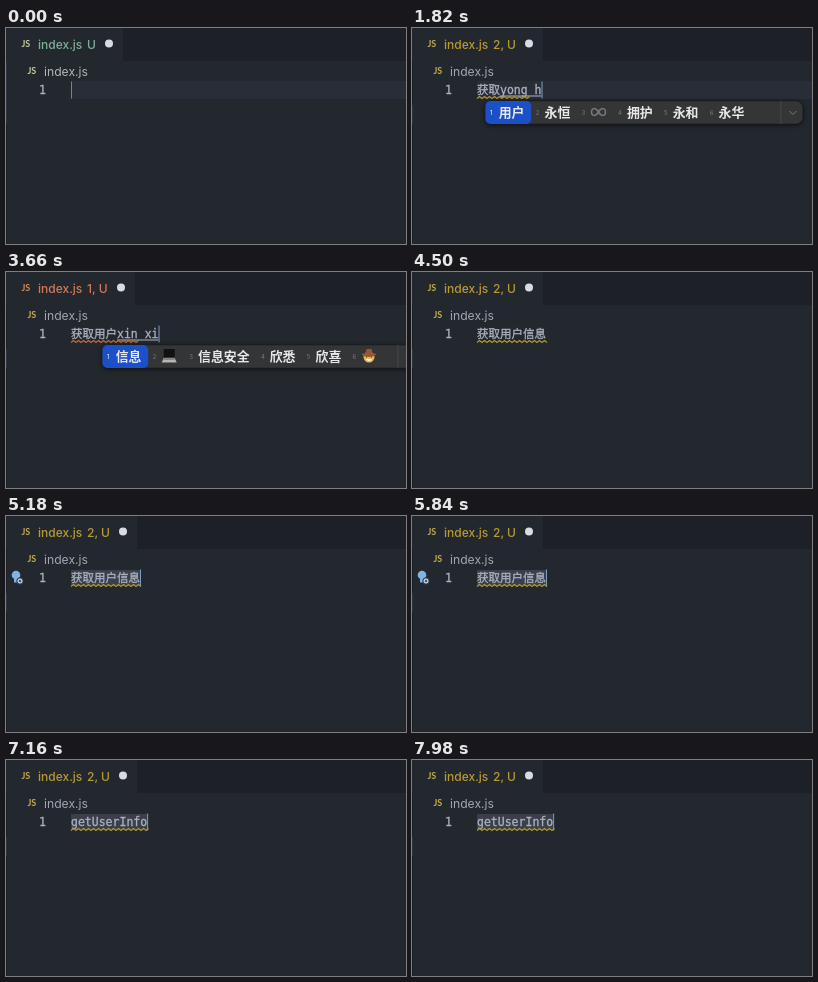
These frames come from a looping animation (400 by 216 pixels, 8000 ms). An HTML page:

```html
<!DOCTYPE html>
<html lang="zh-CN">
<head>
<meta charset="utf-8">
<style>
html, body { margin: 0; width: 100%; height: 100%; overflow: hidden; background: #23272e; }
svg { display: block; width: 400px; height: 216px; }
text { white-space: pre; }
.ui { font: 12.2px Inter, Roboto, sans-serif; }
.tab { font: 500 12px Inter, Roboto, sans-serif; }
.js { font: bold 9px Lato, "Open Sans", sans-serif; }
.code { font: 11.5px "DejaVu Sans Mono", "Noto Sans CJK SC", "Noto Sans CJK", monospace; fill: #abb2bf; stroke: #abb2bf; stroke-width: .3px; }
.pick { font: 700 12.9px "Noto Sans CJK SC", "Noto Sans CJK", sans-serif; fill: #e8e8e8; }
.num { font: 6px Inter, sans-serif; }
.panel { filter: drop-shadow(0 1px 2px #0009); }
</style>
</head>
<body>
<svg id="stage" viewBox="0 0 400 216"></svg>
<script>
const LOOP = 8000, LEFT = 65;
const stage = document.getElementById('stage');

// Time, committed text, text being composed, candidates
const steps = [
  [0, '', '', ''],
  [1320, '', 'h', '和 好 会 还 很 后'],
  [1370, '', 'hu', '户 湖 乎 护 胡 虎'],
  [1410, '', 'huo', '或 获 活 火 货 伙'],
  [1460, '', 'huo q', '获取 或去 火起 获 或'],
  [1510, '', 'huo qu', '获取 或取 货区 火曲 获'],
  [1560, '获取', '', ''],
  [1610, '获取', 'y', '有 一 也 要 用 以'],
  [1660, '获取', 'yo', '有 又 用 由 哟 友'],
  [1700, '获取', 'yon', '用 永 勇 涌 拥 泳'],
  [1750, '获取', 'yong', '用 永 勇 涌 拥 泳'],
  [1800, '获取', 'yong h', '用户 永恒 ∞ 拥护 永和 永华'],
  [1950, '获取', 'yong hu', '用户 拥护 永湖 用 永'],
  [2100, '获取用户', '', ''],
  [2600, '获取用户', 'x', ''],
  [2680, '获取用户', 'x', '下 想 小 向 些 新'],
  [2800, '获取用户', 'xi', '系 西 洗 喜 细 息'],
  [2960, '获取用户', 'xin', '新 心 信 欣 辛 芯'],
  [3220, '获取用户', 'xin x', '信息 新型 心想 欣喜 新'],
  [3500, '获取用户', 'xin xi', '信息 laptop 信息安全 欣悉 欣喜 cowboy'],
  [3820, '获取用户信息', '', ''],
  [6700, 'getUserInfo', '', '']
];

const icons = {
  '∞': x => `<path d="M${x + 8} 84c-3-5-7-4-7 0s4 5 7 0s7-4 7 0s-4 5-7 0" fill="none" stroke="#77787b" stroke-width="1.5"/>`,
  laptop: x => `<path d="M${x + 2} 77h11v8h-11z" fill="#111"/>
    <path d="M${x + 2} 86h11l2 4.500h-15z" fill="#b5b5b5"/><path d="M${x + 2} 87h11" stroke="#555"/>`,
  cowboy: x => `<circle cx="${x + 7.5}" cy="85" r="5.500" fill="#e9b45c"/>
    <path d="M${x} 81q3 2 4 0l1-4h5l1 4q1 2 4 0q-1 4-7.500 4t-7.500-4" fill="#96592f"/>
    <path d="M${x + 4.5} 87h6q-3 4-6 0" fill="#fff"/>
    <path d="M${x + 5} 84.500v1m5-1v1" stroke="#4b3020"/>`
};

const rect = (x, y, w, h, fill, more = '') =>
  `<rect x="${x}" y="${y}" width="${w}" height="${h}" fill="${fill}" ${more}/>`;
const text = (x, y, s, cls, fill) =>
  `<text x="${x}" y="${y}" class="${cls}"${fill ? ` fill="${fill}"` : ''}>${s}</text>`;
const width = s => [...s].reduce((w, c) => w + (c > '\u2e7f' ? 11.5 : 6.92), 0);

function wave(end, color) {
  let d = `M${LEFT} 70.5`;
  for (let x = LEFT, up = 1; x < end; x += 2.5, up = !up) d += `l2.5 ${up ? -2 : 2}`;
  return `<path d="${d}" fill="none" stroke="${color}" stroke-width="1.1"/>`;
}

function panel(x, list) {
  let out = rect(x, 73, 317.5, 23, '#343537', 'rx="7" stroke="#1a1b1d" stroke-width=".6"');
  let at = x;
  list.split(' ').forEach((word, i) => {
    const icon = icons[word], w = icon ? 36.6 : 20 + 12.9 * word.length;
    if (!i) out += rect(x, 73, w, 23, '#1b50c9', 'rx="5"');
    out += text(at + 4.5, 86.5, i + 1, 'num', i ? '#77787b' : '#fff');
    out += icon ? icon(at + 13.5) : text(at + 13.3, 88.7, word, 'pick');
    at += w;
  });
  out += `<path d="M${x + 295.5} 73v23" stroke="#48494c"/>
    <path d="M${x + 304} 83l3.500 3.500l3.500-3.500" fill="none" stroke="#77787b"/>`;
  return `<g class="panel">${out}</g>`;
}

const bulb = `<circle cx="10" cy="59" r="4.300" fill="#7fb4e2"/>
  <path d="M8 62h4v4.500h-4z" fill="#7fb4e2"/>
  <circle cx="14" cy="65" r="3.200" fill="#a9cdec" stroke="#23272e"/>
  <circle cx="14" cy="65" r="1" fill="#23272e"/>`;

function scene(t) {
  const [start, done, typing, list] = steps.findLast(s => s[0] <= t);
  const idle = t < 1320, broken = t >= 3400 && t < 4060, selected = t >= 4700;
  const tone = idle ? '#7fb097' : broken ? '#cf7a58' : '#b89a35';
  const tabWidth = idle ? 117 : broken ? 129 : 131;
  const typed = done + typing, end = LEFT + width(typed), from = LEFT + width(done);
  const caretOn = idle || typing || (t - start) % 1000 < 500;

  let out = rect(0, 0, 400, 216, '#23272e') + rect(tabWidth, 0, 400 - tabWidth, 33, '#1e2027');
  out += rect(0, 33, 1, 183, '#1c2026') + rect(0, idle ? 33 : 77, 1, idle ? 63 : 19, '#2d333f');
  out += text(15.5, 19, 'JS', 'js', idle ? '#c5ca9c' : broken ? '#d08b52' : '#c4ab4c');
  out += text(32, 20.5, 'index.js', 'tab', tone);
  out += text(81, 20.5, idle ? 'U' : broken ? '1, U' : '2, U', 'tab', tone);
  out += `<circle cx="${tabWidth - 14}" cy="15.500" r="4" fill="#d8dbe2"/>`;
  out += text(21.5, 46, 'JS', 'js', idle ? '#c5ca9c' : '#c8ad4a');
  out += text(38, 47.8, 'index.js', 'ui', idle ? '#a9b8b4' : '#a0a6b0');
  out += text(33, 66, '1', 'code');

  if (t < 3400) out += rect(LEFT, 53, 335, 18, '#292d38');
  if (selected) out += rect(LEFT, 54, end - LEFT, 15.5, '#3a404b');
  if (!idle) {
    out += text(LEFT, 66, typed, 'code');
    if (typing) out += rect(from, 67.5, end - from, 1, '#abb2bf');
    // The linter marks the first word only
    out += wave(LEFT + width(typed.split(' ')[0]), broken ? '#c8693f' : '#b59a25');
  }
  if (caretOn) out += rect(end, 53.5, 1, 17, idle ? '#5f8b9f' : '#7f9cc6');
  if (selected && t < 6700) out += bulb;
  if (list) out += panel(from - 14.6, list);
  return out;
}

let shown = '';
function draw(now) {
  const next = scene(now % LOOP);
  if (next !== shown) stage.innerHTML = shown = next;
  requestAnimationFrame(draw);
}
draw(0);
</script>
</body>
</html>
```
